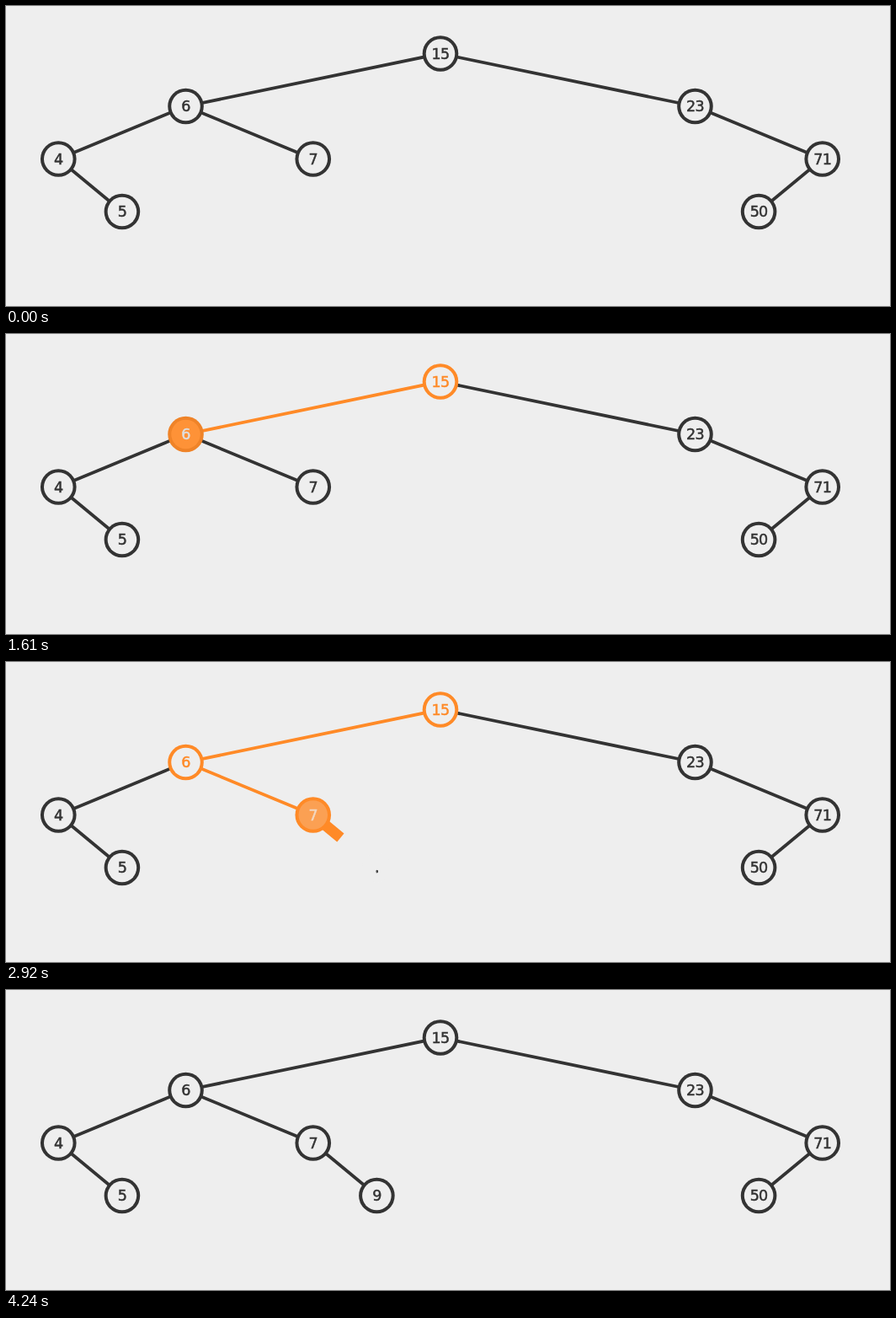
Write an HTML page that moves like this. It is 1050 px wide and 356 px high and loops after 4.48 s.

```html
<!DOCTYPE html>
<html lang="en">
<head>
<meta charset="utf-8">
<title>Binary search tree insertion</title>
<style>
  html, body { margin: 0; width: 100%; height: 100%; overflow: hidden; background: #eee; }
  svg { display: block; width: 100%; height: 100%; }
  text {
    font-family: "DejaVu Sans", "Noto Sans", sans-serif;
    letter-spacing: -0.7px;
    text-anchor: middle;
    stroke-width: 0.5;
  }
</style>
</head>
<body>
<svg id="stage" viewBox="0 0 1050 356"></svg>
<script>
const LOOP = 4480, STEP = 500;
const STARTS = [197, 713, 1247, 1781, 2314, 2847, 3380, 3913];
const SKIP_AT = 2570, SKIP = 164;   // playback jumps ahead here
const NEW_LAG = 47;                 // vertices trail the edge in the insertion step
const INSERT = 5, RESET = 7;
const BG = [238, 238, 238], DARK = [51, 51, 51], HOT = [255, 138, 39];
const OUTER = 21.3, INNER = 17.3, FONT = 17.5, THIN = 3.8, THICK = 13;

const stage = document.getElementById("stage");

function add(tag, attrs) {
  const el = document.createElementNS("http://www.w3.org/2000/svg", tag);
  set(el, attrs);
  return stage.appendChild(el);
}
function set(el, attrs) {
  for (const k in attrs) el.setAttribute(k, attrs[k]);
}

const clamp = x => Math.min(1, Math.max(0, x));
const ease = x => x < 0.5 ? 4 * x ** 3 : 1 - 4 * (1 - x) ** 3;
const mix = (a, b, p) => a.map((v, i) => v + (b[i] - v) * p);
const rgb = c => `rgb(${c.map(Math.round)})`;

// slot: horizontal place in 1/8 of the tree width; fill / open: steps that highlight and hollow it
const nodes = [
  { key: 15, slot: 0, depth: 0, fill: 0, open: 1 },
  { key: 6, slot: -4, depth: 1, fill: 2, open: 3 },
  { key: 23, slot: 4, depth: 1 },
  { key: 4, slot: -6, depth: 2 },
  { key: 7, slot: -2, depth: 2, fill: 4, open: 5 },
  { key: 71, slot: 6, depth: 2 },
  { key: 5, slot: -5, depth: 3 },
  { key: 9, slot: -1, depth: 3, fill: 6, fresh: true },
  { key: 50, slot: 5, depth: 3 }
];
const byKey = {};
for (const n of nodes) {
  n.x = 516 + n.slot * 75.62;
  n.y = 56.5 + n.depth * 62.5;
  byKey[n.key] = n;
}

const edges = [
  [15, 6, 1], [15, 23], [6, 4], [6, 7, 3], [4, 5], [23, 71], [71, 50], [7, 9, INSERT]
].map(([from, to, step]) => {
  const a = byKey[from], b = byKey[to];
  const ends = { x1: a.x, y1: a.y, x2: b.x, y2: b.y };
  return {
    a, b, step,
    thin: add("line", { ...ends, "stroke-width": THIN }),
    thick: add("line", { ...ends, "stroke-width": THICK, stroke: rgb(HOT) })
  };
});

for (const n of nodes) {
  n.ring = add("circle", { cx: n.x, cy: n.y, r: OUTER });
  n.disc = add("circle", { cx: n.x, cy: n.y, r: INNER });
  n.label = add("text", { x: n.x, y: n.y + 6.4, "font-size": FONT });
  n.label.textContent = n.key;
}

function drawEdge(e, raw, reset) {
  const p = e.step === undefined ? 0 : raw[e.step];
  const running = p > 0 && p < 1, done = p === 1;
  const color = done ? mix(HOT, DARK, reset) : DARK;
  set(e.thin, {
    stroke: rgb(color),
    visibility: e.b.fresh && !done ? "hidden" : "visible"
  });
  const q = ease(p);
  set(e.thick, {
    x2: e.a.x + (e.b.x - e.a.x) * q,
    y2: e.a.y + (e.b.y - e.a.y) * q,
    visibility: running ? "visible" : "hidden"
  });
}

function drawNode(n, prog, reset) {
  const on = n.fill === undefined ? 0 : prog[n.fill];
  const open = n.open === undefined ? 0 : prog[n.open];
  const ring = mix(mix(DARK, HOT, on), DARK, reset);
  const disc = mix(mix(mix(BG, HOT, on), BG, open), BG, reset);
  const ink = rgb(mix(mix(mix(DARK, BG, on), HOT, open), DARK, reset));
  set(n.ring, { fill: rgb(ring) });
  set(n.disc, { fill: rgb(disc) });
  set(n.label, { fill: ink, stroke: ink });
  if (n.fresh) {
    const grow = prog[INSERT];
    const visibility = grow > 0 ? "visible" : "hidden";
    set(n.ring, { r: OUTER * grow });
    set(n.disc, { visibility });
    set(n.label, { "font-size": FONT * grow, visibility });
  }
}

function draw(ms) {
  const t = ms < SKIP_AT ? ms : ms + SKIP;
  const raw = STARTS.map(s => clamp((t - s) / STEP));
  const prog = STARTS.map((s, i) =>
    ease(clamp((t - s - (i === INSERT ? NEW_LAG : 0)) / STEP)));
  const reset = prog[RESET];
  edges.forEach(e => drawEdge(e, raw, reset));
  nodes.forEach(n => drawNode(n, prog, reset));
}

const begin = performance.now();
function tick() {
  draw((performance.now() - begin) % LOOP);
  requestAnimationFrame(tick);
}
tick();
</script>
</body>
</html>
```
